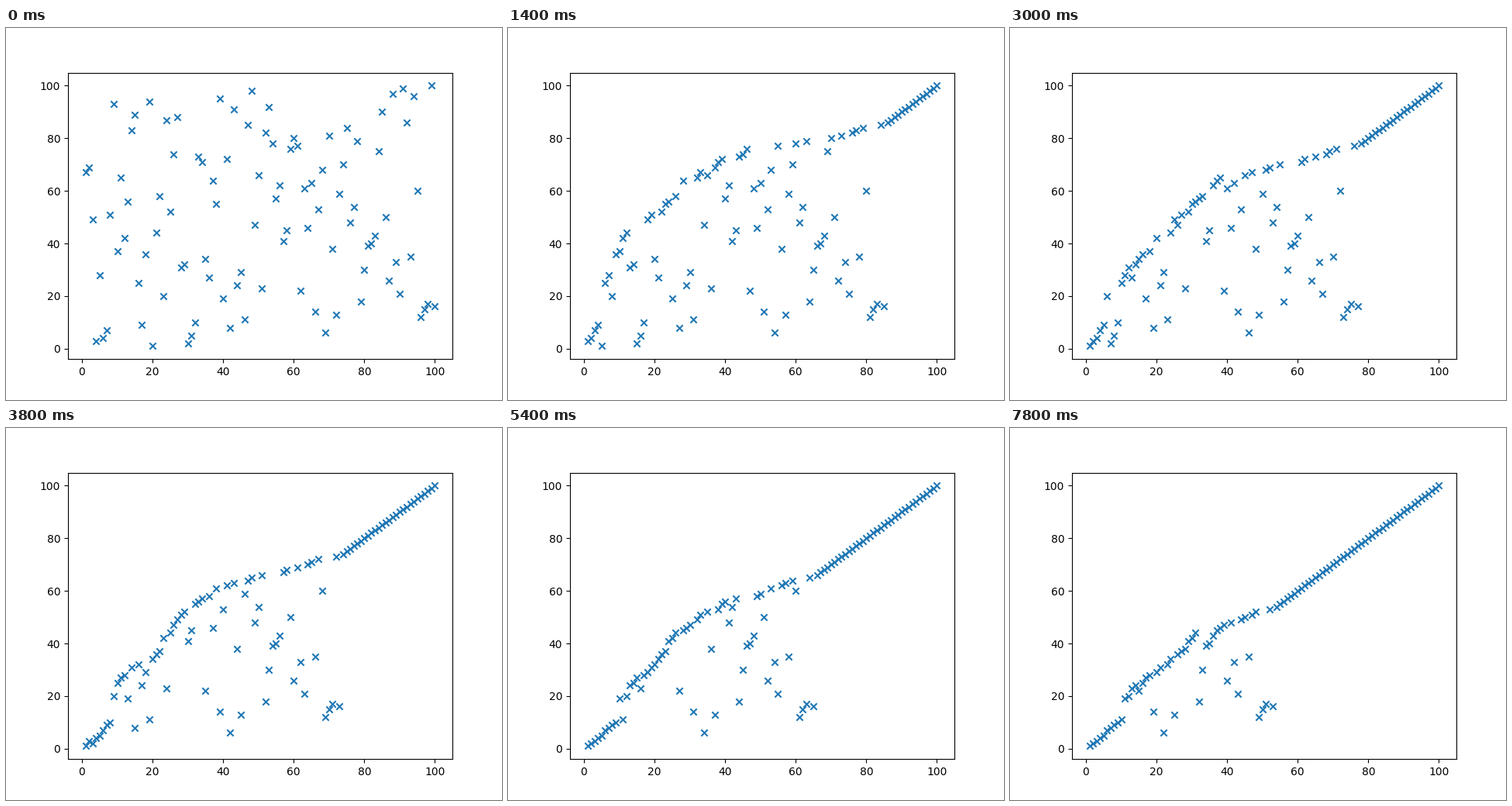
A matplotlib script that plays this animation: 640x480 px, repeating every 8000 ms.

```python
import matplotlib.pyplot as plt
import numpy as np
from matplotlib.animation import FuncAnimation

FRAMES = 40
INTERVAL = 200
HEAD_START = 8  # extra passes done in the first step

START = [
    67, 69, 49, 3, 28, 4, 7, 51, 93, 37, 65, 42, 56, 83, 89, 25, 9, 36, 94, 1,
    44, 58, 20, 87, 52, 74, 88, 31, 32, 2, 5, 10, 73, 71, 34, 27, 64, 55, 95, 19,
    72, 8, 91, 24, 29, 11, 85, 98, 47, 66, 23, 82, 92, 78, 57, 62, 41, 45, 76, 80,
    77, 22, 61, 46, 63, 14, 53, 68, 6, 81, 38, 13, 59, 70, 84, 48, 54, 79, 18, 30,
    39, 40, 43, 75, 90, 50, 26, 97, 33, 21, 99, 86, 35, 96, 60, 12, 15, 17, 100, 16,
]


def bubble_pass(values):
    """Return the list after one left-to-right bubble sort pass."""
    out = list(values)
    for i in range(len(out) - 1):
        if out[i] > out[i + 1]:
            out[i], out[i + 1] = out[i + 1], out[i]
    return out


passes = [START]
for _ in range(FRAMES + HEAD_START):
    passes.append(bubble_pass(passes[-1]))

x = np.arange(1, len(START) + 1)
fig, ax = plt.subplots(figsize=(6.4, 4.8), dpi=100)
points = ax.scatter(x, START, marker="x")
ax.set_xlim(ax.get_xlim())
ax.set_ylim(ax.get_ylim())


def update(frame):
    done = frame + HEAD_START if frame else 0
    points.set_offsets(np.column_stack([x, passes[done]]))
    return (points,)


anim = FuncAnimation(fig, update, frames=FRAMES, interval=INTERVAL,
                     repeat=True, repeat_delay=0)
plt.show()
```
